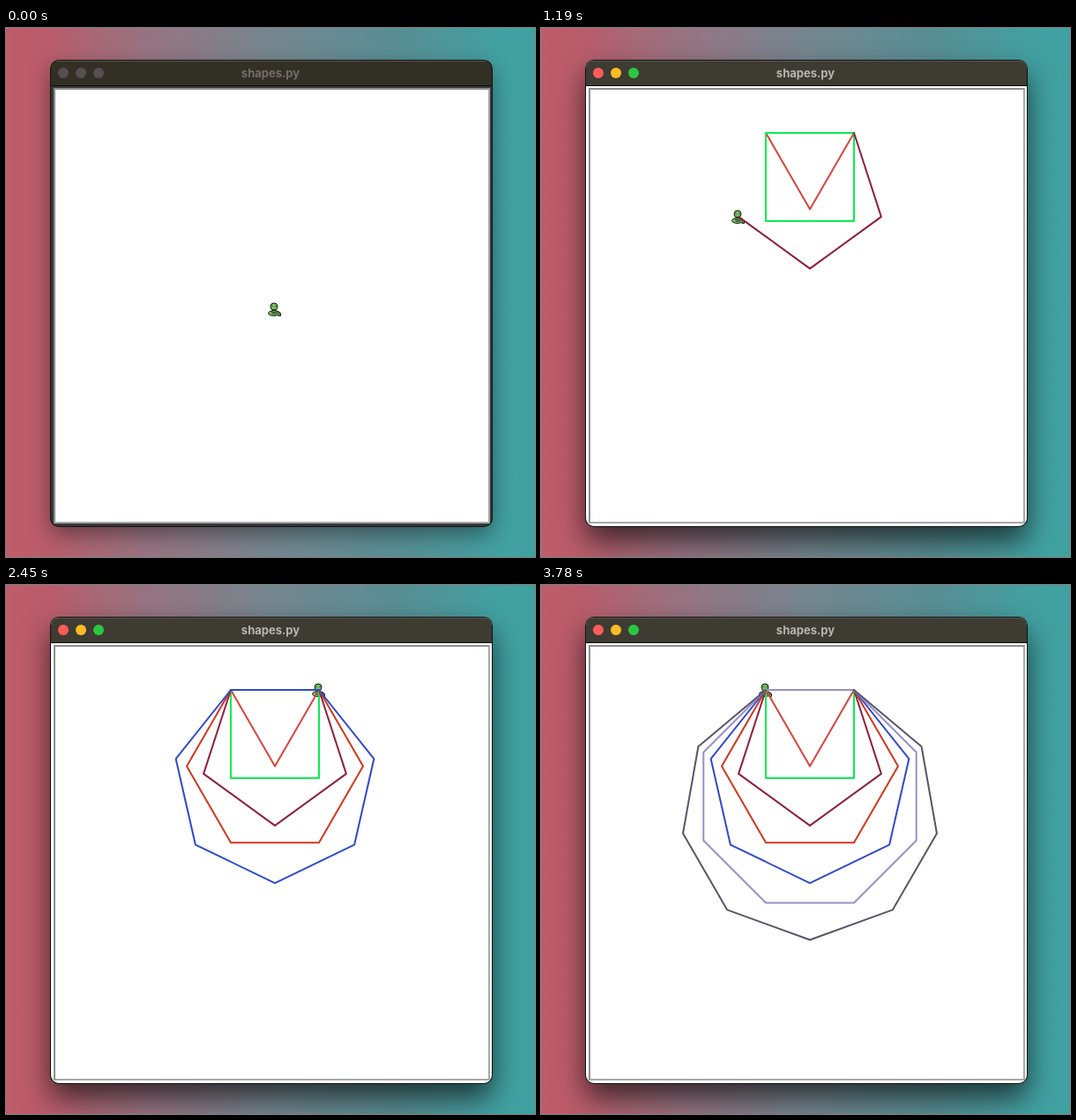
These frames come from a looping animation (600 px wide and 600 px high, 3850 ms). An HTML page:

```html
<!DOCTYPE html>
<html lang="en">
<head>
<meta charset="utf-8">
<title>shapes.py</title>
<style>
  html, body { margin: 0; width: 100%; height: 100%; overflow: hidden; }
  body {
    position: relative;
    background: linear-gradient(90deg, #c05c6b 0, #b95c6b 8%, #9a7280 25%, #75868f 50%, #578f94 75%, #42a0a1 93%, #40a1a1);
  }
  #window {
    position: absolute; left: 51px; top: 37px; width: 500px; height: 528px;
    border-radius: 9px; overflow: hidden; background: #38383a;
    box-shadow: 0 0 0 1px #111, 0 9px 24px rgba(0, 0, 0, .42);
  }
  #bar {
    height: 28px; background: #322f24; border-bottom: 1px solid #0c0c0a;
    box-shadow: inset 0 1px #5b594e;
    font: 700 13px/28px Inter, "Open Sans", sans-serif;
    text-align: center; color: #766c6d;
  }
  #title { position: absolute; left: 0; right: 2px; }
  #bar i {
    position: absolute; top: 7.7px; width: 12.6px; height: 12.6px;
    border-radius: 50%; background: #584d50;
  }
  #bar i:nth-of-type(1) { left: 7.7px; }
  #bar i:nth-of-type(2) { left: 27.7px; }
  #bar i:nth-of-type(3) { left: 47.7px; }
  #page {
    position: absolute; left: 3px; top: 31px; width: 491px; height: 490px;
    border: 2px solid; border-color: #8e8e8e #a8a8a8 #a8a8a8 #8e8e8e; background: #fff;
  }
  #window.active { background: #fff; }
  .active #bar { background: #3d3b32; color: #b8b6b0; }
  .active #bar i:nth-of-type(1) { background: #ff5b57; }
  .active #bar i:nth-of-type(2) { background: #ffbc22; }
  .active #bar i:nth-of-type(3) { background: #2ac840; }
  #window.active { box-shadow: 0 0 0 1px #111, 0 16px 32px rgba(0, 0, 0, .65); }
  svg { position: absolute; left: 0; top: 0; }
  polyline { fill: none; stroke-width: 2; stroke-linecap: round; stroke-linejoin: round; }
</style>
</head>
<body>
<div id="window">
  <div id="bar"><i></i><i></i><i></i><span id="title">shapes.py</span></div>
  <div id="page"></div>
</div>
<svg id="drawing" width="600" height="600">
  <g id="snake" fill="#74bb60" stroke="#10180e">
    <path d="M3 2L6.5 4.5V7.5H4Z"/>
    <ellipse cx="-1.2" cy="4.5" rx="6.3" ry="3"/>
    <path d="M-4.5 2.5Q-1 5 3 2.5M-3.5 5Q0 6 3.5 4" fill="none" stroke-width=".8"/>
    <ellipse cx="-1" cy="-3" rx="4" ry="4"/>
    <path d="M-3-4v1M1-4v1" fill="none" stroke-width=".9"/>
  </g>
</svg>
<script>
const LOOP = 3850, TICK = 70, SIDE = 100;
const HOME = [305, 319], START = [355, 119];

// Ticks on which the turtle only turns, and ticks on which it covers half a side.
const holds = [2, 4, 10, 36];
const halves = [7, 8, 12, 13, 15, 16, 19, 20, 24, 25, 27, 28, 43, 44, 50, 51];

const drawing = document.getElementById("drawing");
const snake = document.getElementById("snake");
const win = document.getElementById("window");

const colors = ["#d9443b", "#08ee50", "#8f1f3b", "#d2371c", "#2f49cd", "#9790c8", "#575769"];
const shapes = colors.map((color, i) => {
  const line = document.createElementNS("http://www.w3.org/2000/svg", "polyline");
  line.setAttribute("stroke", color);
  drawing.append(line);
  return { sides: i + 3, line };
});

function sidesDrawn(tick) {
  const passed = list => list.filter(t => t <= tick).length;
  return Math.max(0, tick - 1 - passed(holds) - passed(halves) / 2);
}

function trace(sides, amount) {
  let [x, y] = START;
  const points = [START];
  for (let k = 1; k < amount + 1; k++) {
    const angle = 2 * Math.PI * k / sides;
    const step = SIDE * Math.min(1, amount - k + 1);
    x += step * Math.cos(angle);
    y += step * Math.sin(angle);
    points.push([x, y]);
  }
  return points;
}

function render(time) {
  const tick = Math.floor(time % LOOP / TICK);
  let left = sidesDrawn(tick);
  let position = tick ? START : HOME;
  win.classList.toggle("active", tick > 0);
  for (const { sides, line } of shapes) {
    const amount = Math.min(left, sides);
    left -= amount;
    const points = amount ? trace(sides, amount) : [];
    line.setAttribute("points", points.join(" "));
    if (amount) position = points.at(-1);
  }
  snake.setAttribute("transform", `translate(${position.map(Math.round)})`);
}

const begin = performance.now();
function frame() {
  render(performance.now() - begin);
  requestAnimationFrame(frame);
}
frame();
</script>
</body>
</html>
```
